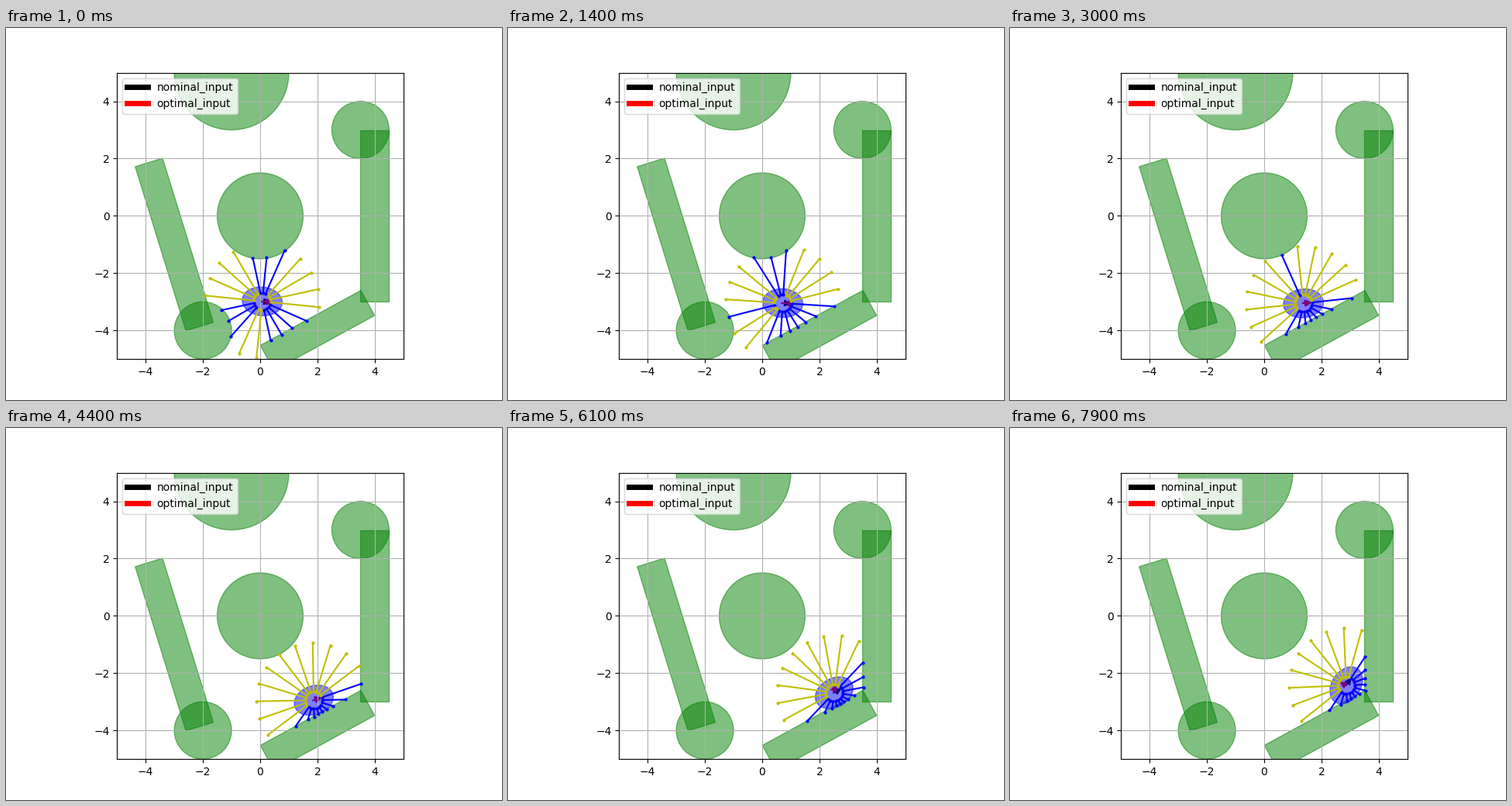
A matplotlib script that plays this animation: 640x480 px, repeating every 8000 ms.

```python
import numpy as np
import matplotlib.pyplot as plt
from matplotlib.animation import FuncAnimation
from matplotlib.lines import Line2D
from matplotlib.patches import Circle, Ellipse, Rectangle

FRAMES, STEP_MS = 80, 100
RAYS = 20
REACH = np.linspace(0.3, 2.0, 35)

# (x, y, radius) and (cx, cy, width, height, angle in rad)
CIRCLES = [(0, 0, 1.5), (-1, 5, 2), (3.5, 3, 1), (-2, -4, 1)]
BOXES = [(-3, -1, 1, 6, 0.3), (4, 0, 1, 6, 0), (2, -4, 4, 1, 0.5)]

# Key poses of the robot: time, x, y, heading in degrees
POSES = np.array([
    (0.0, 0.07, -2.985, -5.8), (1.4, 0.717, -3.045, -3.7),
    (3.0, 1.37, -3.055, 6.2), (4.4, 1.87, -2.945, 19.1),
    (5.3, 2.225, -2.8, 23.2), (6.9, 2.735, -2.57, 37.3),
    (7.9, 2.865, -2.425, 56.5)])
TIMES, KEYS = POSES[:, 0], POSES[:, 1:]
SLOPES = np.gradient(KEYS, TIMES, axis=0)


def pose(t):
    """Cubic Hermite curve through the key poses."""
    k = int(np.clip(np.searchsorted(TIMES, t, "right") - 1, 0, len(TIMES) - 2))
    h = TIMES[k + 1] - TIMES[k]
    u = (t - TIMES[k]) / h
    v = 1 - u
    return (v * v * ((1 + 2 * u) * KEYS[k] + u * h * SLOPES[k])
            + u * u * ((1 + 2 * v) * KEYS[k + 1] - v * h * SLOPES[k + 1]))


def blocked(x, y):
    hit = np.zeros(x.shape, bool)
    for cx, cy, r in CIRCLES:
        hit |= np.hypot(x - cx, y - cy) <= r
    for cx, cy, w, h, a in BOXES:
        dx, dy = x - cx, y - cy
        c, s = np.cos(a), np.sin(a)
        hit |= (abs(c * dx + s * dy) <= w / 2) & (abs(c * dy - s * dx) <= h / 2)
    return hit


def point_arrow(arrow, x, y, length, angle):
    a = np.radians(angle)
    arrow.set_data(x=x, y=y, dx=length * np.cos(a), dy=length * np.sin(a))


fig, ax = plt.subplots(figsize=(6.4, 4.8), dpi=100)
ax.set_aspect("equal")
ax.set(xlim=(-5, 5), ylim=(-5, 5))
ax.set_xticks(range(-4, 5, 2))
ax.set_yticks(range(-4, 5, 2))
ax.grid(True)

for cx, cy, r in CIRCLES:
    ax.add_patch(Circle((cx, cy), r, color="g", alpha=0.5))
for cx, cy, w, h, a in BOXES:
    ax.add_patch(Rectangle((cx - w / 2, cy - h / 2), w, h, angle=np.degrees(a),
                           rotation_point="center", color="g", alpha=0.5))

nominal, optimal = [
    ax.arrow(0, -3, 0.1, 0, width=0.001, head_width=0.2, head_length=0.2, color=c)
    for c in ("k", "r")]
body = ax.add_patch(Ellipse((0, -3), 1.4, 1.0, color="b", alpha=0.5))
rays = [ax.plot([], [], "o-", ms=2, lw=1.5)[0] for _ in range(RAYS)]

ax.legend([Line2D([], [], color=c, lw=5) for c in ("k", "r")],
          ["nominal_input", "optimal_input"], loc="upper left")


def update(i):
    t = i * STEP_MS / 1000
    x, y, heading = pose(t)
    body.set_center((x, y))
    body.set_angle(heading)

    # Arrows start at the previous pose; the optimal one turns left at the wall.
    x0, y0, _ = pose(t - STEP_MS / 1000)
    push = np.interp(t, (0, 1.4, 3.6, 5.3, 6.9), (0.2, 0.25, 0.02, 0.16, 0.02))
    turn = np.interp(t, (5.3, 6.9), (0, 90))
    point_arrow(nominal, x0, y0, 0.1, heading)
    point_arrow(optimal, x0, y0, push, heading + turn)

    for k, ray in enumerate(rays):
        a = np.radians(heading + 360 * k / RAYS)
        px, py = x + REACH * np.cos(a), y + REACH * np.sin(a)
        hit = blocked(px, py)
        end = hit.argmax() if hit.any() else -1
        ray.set_data([px[0], px[end]], [py[0], py[end]])
        ray.set_color("b" if hit.any() else "y")
    return [body, nominal, optimal, *rays]


anim = FuncAnimation(fig, update, frames=FRAMES, interval=STEP_MS,
                     repeat=True, repeat_delay=0)
plt.show()
```
